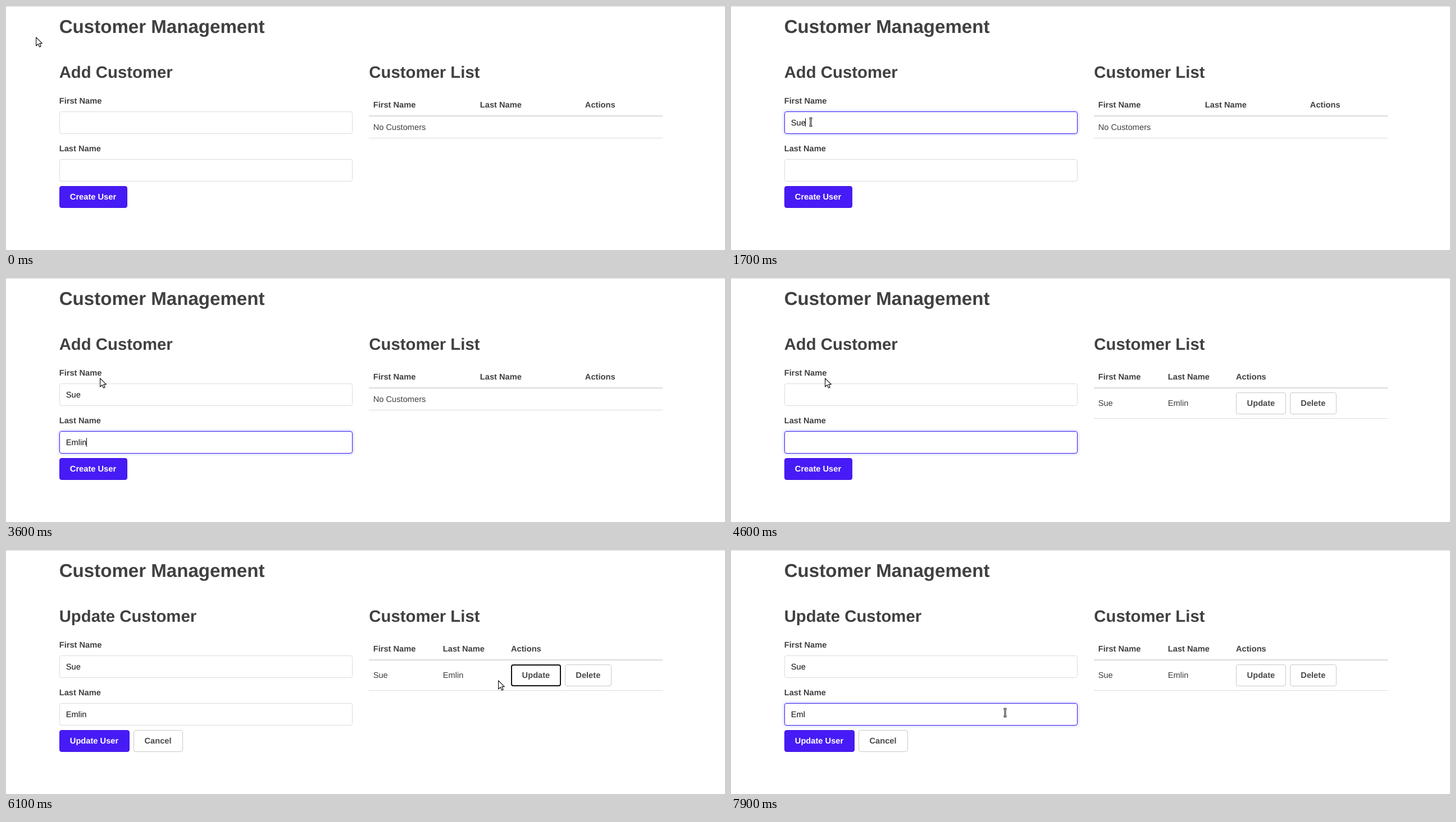
An HTML page that plays this animation: 1280x435 px, repeating every 8000 ms.

```html
<!DOCTYPE html>
<html lang="en">
<head>
<meta charset="utf-8">
<title>Customer Management</title>
<style>
  html, body { margin: 0; width: 100%; height: 100%; overflow: hidden; background: #fff; }
  #stage { position: relative; width: 1280px; height: 435px; overflow: hidden; }
  #stage > * { position: absolute; box-sizing: border-box; }
  svg { left: 0; top: 0; }
  text {
    font: 14.667px "Liberation Sans", Arial, sans-serif;
    fill: #404040; white-space: pre; text-rendering: geometricPrecision;
  }
  .b { font-weight: 700; }
  .h1 { font-size: 33.1px; }
  .h2 { font-size: 29.33px; }
  .val { fill: #111; }
  .on { fill: #fff; }
  .btn text, text.btn { fill: #4a4a4a; }
  .field { left: 95px; width: 522px; height: 40px; border: 1px solid #dbdbdb; border-radius: 4px; }
  .field.hover { border-color: #b8b8b8; }
  .field.focus { border-color: #471bf0; box-shadow: 0 0 5px rgba(60, 110, 255, .55); }
  .button { height: 39px; border: 1px solid #c9c9c9; border-radius: 4px; background: #fff; }
  .button.hover { border-color: #6e6e6e; }
  .button.ring { border: 2px solid #101010; }
  .primary { background: #471bf5; border-color: #3f14e6; }
  .rule { left: 646px; width: 523px; background: #dbdbdb; }
</style>
</head>
<body>
<div id="stage">
  <div style="left:0;top:0;width:1280px;height:1px;background:#e6e6e6"></div>
  <div style="left:0;top:1px;width:1280px;height:1px;background:#f3f3f3"></div>
  <div class="field" id="field1" style="top:188px"></div>
  <div class="field" id="field2" style="top:273px"></div>
  <div class="button primary" id="submit" style="left:95px;top:321px"></div>
  <div class="button" id="cancel" style="left:227px;top:321px;width:88px"></div>
  <div class="rule" style="top:195px;height:2px"></div>
  <div class="rule" id="rowLine" style="height:1px"></div>
  <div class="button" id="update" style="left:899px;top:204px;width:89px"></div>
  <div class="button" id="delete" style="left:995px;top:204px;width:83px"></div>

  <svg width="1280" height="435" viewBox="0 0 1280 435">
    <text class="b h1" x="94.7" y="48">Customer Management</text>
    <text class="b h2" id="heading" x="94.7" y="128"></text>
    <text class="b h2" x="646.3" y="128">Customer List</text>
    <text class="b" x="94.7" y="174">First Name</text>
    <text class="b" x="94.7" y="259">Last Name</text>
    <text class="val" id="first" x="106.8" y="213"></text>
    <text class="val" id="last" x="106.8" y="298"></text>
    <text class="b on" id="submitText" x="113.8" y="345"></text>
    <text class="b btn" id="cancelText" x="246.5" y="345">Cancel</text>

    <text class="b" x="653.7" y="181">First Name</text>
    <text class="b" id="headLast" y="181">Last Name</text>
    <text class="b" id="headActions" y="181">Actions</text>
    <text id="empty" x="653.7" y="221">No Customers</text>
    <g id="row">
      <text x="653.7" y="228">Sue</text>
      <text x="777.8" y="228">Emlin</text>
      <text class="b btn" x="918.6" y="228">Update</text>
      <text class="b btn" x="1014.3" y="228">Delete</text>
    </g>

    <rect id="caret" width="1" fill="#111"/>

    <g id="arrow" fill="#fff" stroke="#1a1a1a" stroke-width="1.2" stroke-linejoin="round">
      <path d="M.6 .8V16L4.2 12.6 6.6 18 9.2 16.9 6.8 11.6H11.4Z"/>
    </g>
    <g id="beam" fill="none">
      <path d="M-2.4 -6.7H2.4M-2.4 6.7H2.4M0 -6.7V6.7" stroke="#111" stroke-width="3"/>
      <path d="M-1.6 -6.7H1.6M-1.6 6.7H1.6M0 -6.7V6.7" stroke="#fff" stroke-width="1"/>
    </g>
    <g id="hand" fill="#fff" stroke="#1a1a1a" stroke-width="1.2" stroke-linejoin="round">
      <path d="M-2.4 2.6V-5.2Q-2.4 -6.7 -.9 -6.7T.6 -5.2V-1.6H6Q7.8 -1.4 7.8 .6V4.4L6.8 7.4H-2.2L-5.4 3.2Q-6 1.2 -4.4 1.2Z"/>
      <path d="M.6 -1V1M3 -1V1M5.4 -.8V1" stroke-width=".9"/>
    </g>
  </svg>
</div>
<script>
const LOOP = 8000;
const $ = id => document.getElementById(id);

// Each row: start time, then the value held until the next row.
const pointer = [
  [0, "arrow", 53, 55], [100, "arrow", 66, 92], [200, "arrow", 98, 148],
  [300, "beam", 133, 198], [400, "beam", 142, 207],
  [3500, "arrow", 166, 170], [3600, "arrow", 167, 178],
  [4900, "beam", 230, 201], [5000, "beam", 370, 212], [5100, "beam", 530, 218],
  [5200, "arrow", 700, 221], [5300, "arrow", 826, 222],
  [5600, "arrow", 884, 222], [5700, "hand", 913, 225], [5800, "hand", 917, 226],
  [6100, "arrow", 876, 232], [6200, "arrow", 770, 250], [6300, "arrow", 655, 268],
  [6400, "beam", 560, 280], [6500, "beam", 512, 286], [6600, "beam", 493, 288],
  [6700, "beam", 489, 288], [7100, "beam", 488, 290]
];
const firstName = [[0, ""], [1400, "S"], [1600, "Su"], [1700, "Sue"], [4000, ""], [6000, "Sue"]];
const lastName = [
  [0, ""], [3000, "E"], [3200, "Em"], [3300, "Eml"], [3400, "Emli"], [3500, "Emlin"],
  [4000, ""], [6000, "Emlin"], [7600, "Emli"], [7900, "Eml"]
];
const focus = [[0, ""], [700, "field1"], [2100, "field2"], [6000, "update"], [6800, "field2"]];
const caretOn = [
  [0, 0], [700, 1], [1300, 0], [1400, 1], [2800, 0], [3000, 1],
  [4600, 0], [5200, 1], [5800, 0], [6800, 1], [7400, 0]
];

const at = (rows, t) => rows.findLast(r => r[0] <= t).slice(1);
const show = (id, on) => { $(id).style.display = on ? "" : "none"; };
const setText = (id, s) => { if ($(id).textContent !== s) $(id).textContent = s; };

function hovered(x, y) {
  if (x >= 95 && x < 617) {
    if (y >= 188 && y < 228) return "field1";
    if (y >= 273 && y < 313) return "field2";
  }
  return "";
}

function drawCaret(t, focused) {
  const inField = focused.startsWith("field");
  show("caret", inField && at(caretOn, t)[0]);
  if (!inField) return;
  const second = focused === "field2";
  const value = $(second ? "last" : "first");
  const filled = value.textContent !== "";
  const x = filled ? Math.floor(106.7 + value.getComputedTextLength()) : 107;
  $("caret").setAttribute("x", x);
  $("caret").setAttribute("y", (second ? 286 : 201) - (filled ? 1 : 0));
  $("caret").setAttribute("height", second ? 16 : 15);
}

function render(t) {
  const [kind, x, y] = at(pointer, t);
  const [focused] = at(focus, t);
  const listed = t >= 4300;
  const editing = t >= 6000;
  const over = kind === "hand" ? "update" : hovered(x, y);

  for (const id of ["arrow", "beam", "hand"]) show(id, id === kind);
  $(kind).setAttribute("transform", `translate(${x} ${y})`);

  for (const id of ["field1", "field2", "update"]) {
    const c = $(id).classList;
    c.toggle("hover", over === id);
    c.toggle(id === "update" ? "ring" : "focus", focused === id);
  }

  setText("first", at(firstName, t)[0]);
  setText("last", at(lastName, t)[0]);
  drawCaret(t, focused);

  setText("heading", editing ? "Update Customer" : "Add Customer");
  setText("submitText", editing ? "Update User" : "Create User");
  $("submit").style.width = editing ? "125px" : "121px";
  show("cancel", editing);
  show("cancelText", editing);

  $("headLast").setAttribute("x", listed ? 777.8 : 843.8);
  $("headActions").setAttribute("x", listed ? 899 : 1030.8);
  $("rowLine").style.top = listed ? "250px" : "235px";
  show("empty", !listed);
  for (const id of ["row", "update", "delete"]) show(id, listed);
}

const start = performance.now();
function tick() {
  render((performance.now() - start) % LOOP);
  requestAnimationFrame(tick);
}
tick();
</script>
</body>
</html>
```
